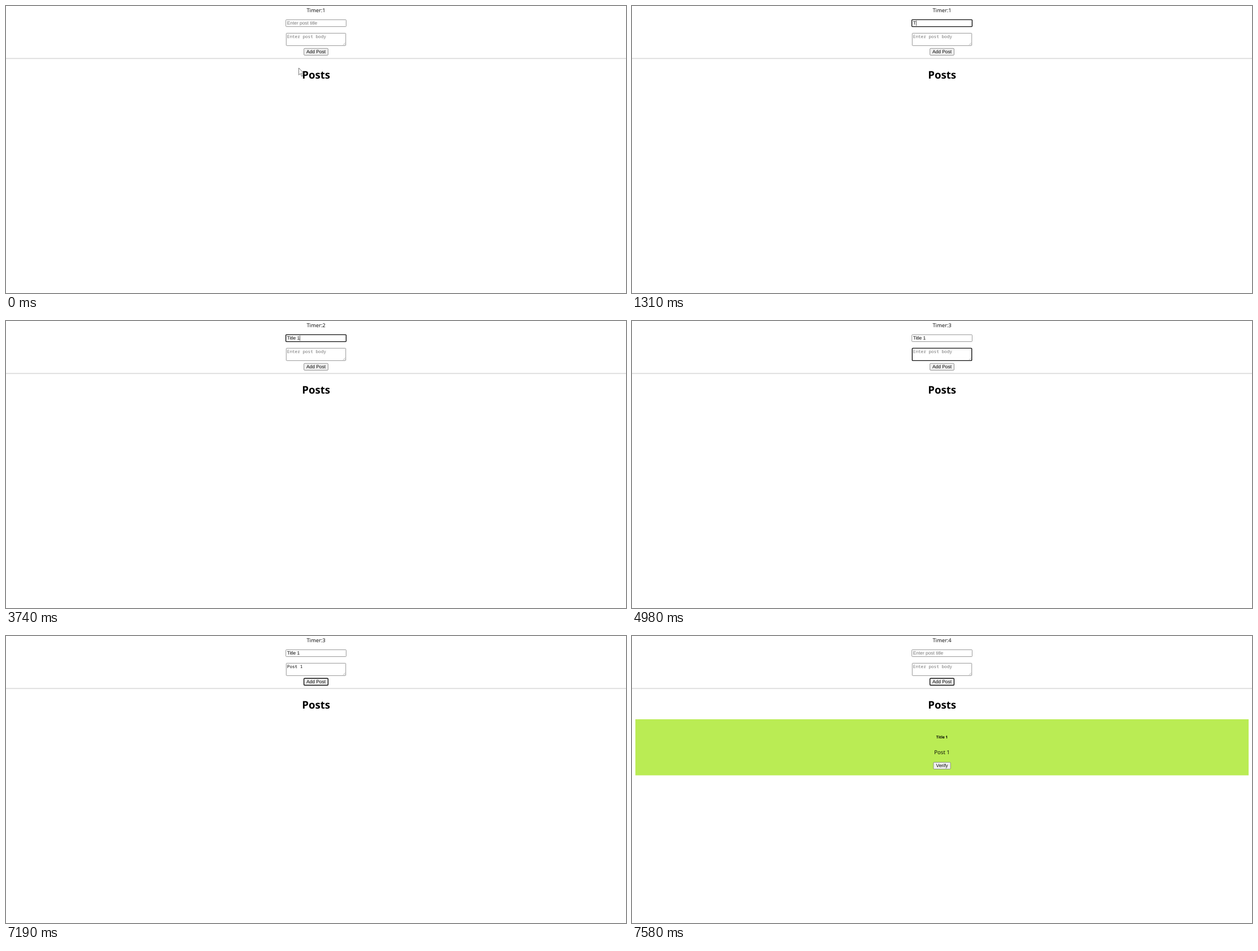
Write an HTML page that moves like this. It is 1098 by 510 pixels and loops after 8 s.

```html
<!DOCTYPE html>
<html lang="en">
<head>
<meta charset="utf-8">
<title>Post form</title>
<style>
html, body { margin: 0; height: 100%; overflow: hidden; background: #fff; }
svg { display: block; width: 100vw; height: 100vh; }
text { font: 9.4px "Open Sans", "Noto Sans", sans-serif; white-space: pre; text-rendering: geometricPrecision; }
.mid { text-anchor: middle; }
.ui { font: 8.38px "Liberation Sans", Arial, sans-serif; }
.mono { font: 7.68px "Noto Sans Mono", "DejaVu Sans Mono", monospace; }
.box, .btn { fill: #fff; stroke: #767676; stroke-width: .75; }
.btn { fill: #efefef; }
.focus { stroke: #101010; stroke-width: 1.4; }
.empty { fill: #757575; }
</style>
</head>
<body>
<svg viewBox="0 0 1098 510">
  <text id="timer" class="mid" x="549" y="10.8"></text>

  <rect class="box field" x="495.6" y="24.4" width="106.8" height="12.2" rx="1"/>
  <text id="title" class="ui" x="497.7" y="33.2"></text>

  <rect class="box field" x="496.3" y="48.4" width="105.4" height="22" rx="1"/>
  <path d="M596.8 69.4l4-4M599.3 69.4l1.5-1.5" stroke="#888" stroke-width=".6"/>
  <text id="body" class="mono" x="497.8" y="57.2"></text>

  <rect class="btn field" x="527.6" y="75.3" width="42.8" height="12.2" rx="1.5"/>
  <text class="ui mid" x="549" y="84.2">Add Post</text>

  <rect id="caret" width=".65" height="9.5"/>
  <path d="M0 93.2H1098" stroke="#9a9a9a" stroke-width=".7"/>
  <path d="M0 93.9H1098" stroke="#eee" stroke-width=".7"/>
  <text class="mid" x="549.2" y="128.8" style="font-size:18.6px;font-weight:700">Posts</text>

  <g id="post">
    <rect x="6" y="148" width="1086" height="99.6" fill="#baec54"/>
    <text class="mid" x="549" y="181.9" style="font-size:6.7px;font-weight:700">Title 1</text>
    <text class="mid" x="549" y="209.8" style="font-size:9.6px">Post 1</text>
    <rect class="btn" x="533.9" y="224.4" width="30.2" height="12.1" rx="1.5"/>
    <text class="ui mid" x="549" y="233.3">Verify</text>
  </g>

  <path id="pointer" d="M0 0V12.6L2.9 10L5 15L6.9 14.2L4.8 9.3H8.6Z" fill="#fff" stroke="#222" stroke-width=".6"/>
</svg>
<script>
const LOOP = 8000, ADDED = 7510;
const TICKS = [0, 1710, 4650, 7580];
const TITLE_KEYS = [1310, 1630, 1790, 1960, 2110, 2270, 2680];
const BODY_KEYS = [5710, 6050, 6200, 6450, 6540, 6780];
const FOCUS = [490, 4480, 7190];
const BLINKS = [490, 970, 1310, 3250, 3740, 4330, 4480, 4980, 5460, 7190];
const MOVES = [100, 170, 240];
const SPOTS = [[518.5, 110], [527, 82], [537, 45]];

const $ = id => document.getElementById(id);
const fields = document.querySelectorAll('.field');
const passed = (times, t) => times.filter(x => x <= t).length;
const show = (el, on) => el.setAttribute('visibility', on ? 'visible' : 'hidden');

// Writes the typed part or the placeholder; returns the caret position.
function type(el, full, keys, hint, t) {
  const typed = t < ADDED ? full.slice(0, passed(keys, t)) : '';
  el.textContent = typed || hint;
  el.classList.toggle('empty', !typed);
  return 497.8 + (typed ? el.getComputedTextLength() : 0);
}

function draw(t) {
  $('timer').textContent = 'Timer:' + passed(TICKS, t);
  const ends = [
    type($('title'), 'Title 1', TITLE_KEYS, 'Enter post title', t),
    type($('body'), 'Post 1', BODY_KEYS, 'Enter post body', t)
  ];

  const active = passed(FOCUS, t) - 1;
  fields.forEach((f, i) => f.classList.toggle('focus', i === active));
  show($('caret'), passed(BLINKS, t) % 2);
  $('caret').setAttribute('x', ends[active] || 0);
  $('caret').setAttribute('y', active ? 50.2 : 25.8);

  const spot = SPOTS[passed(MOVES, t)];
  show($('pointer'), spot);
  if (spot) $('pointer').setAttribute('transform', `translate(${spot})`);
  show($('post'), t >= ADDED);
}

const start = performance.now();
function loop() {
  draw((performance.now() - start) % LOOP);
  requestAnimationFrame(loop);
}
loop();
</script>
</body>
</html>
```
